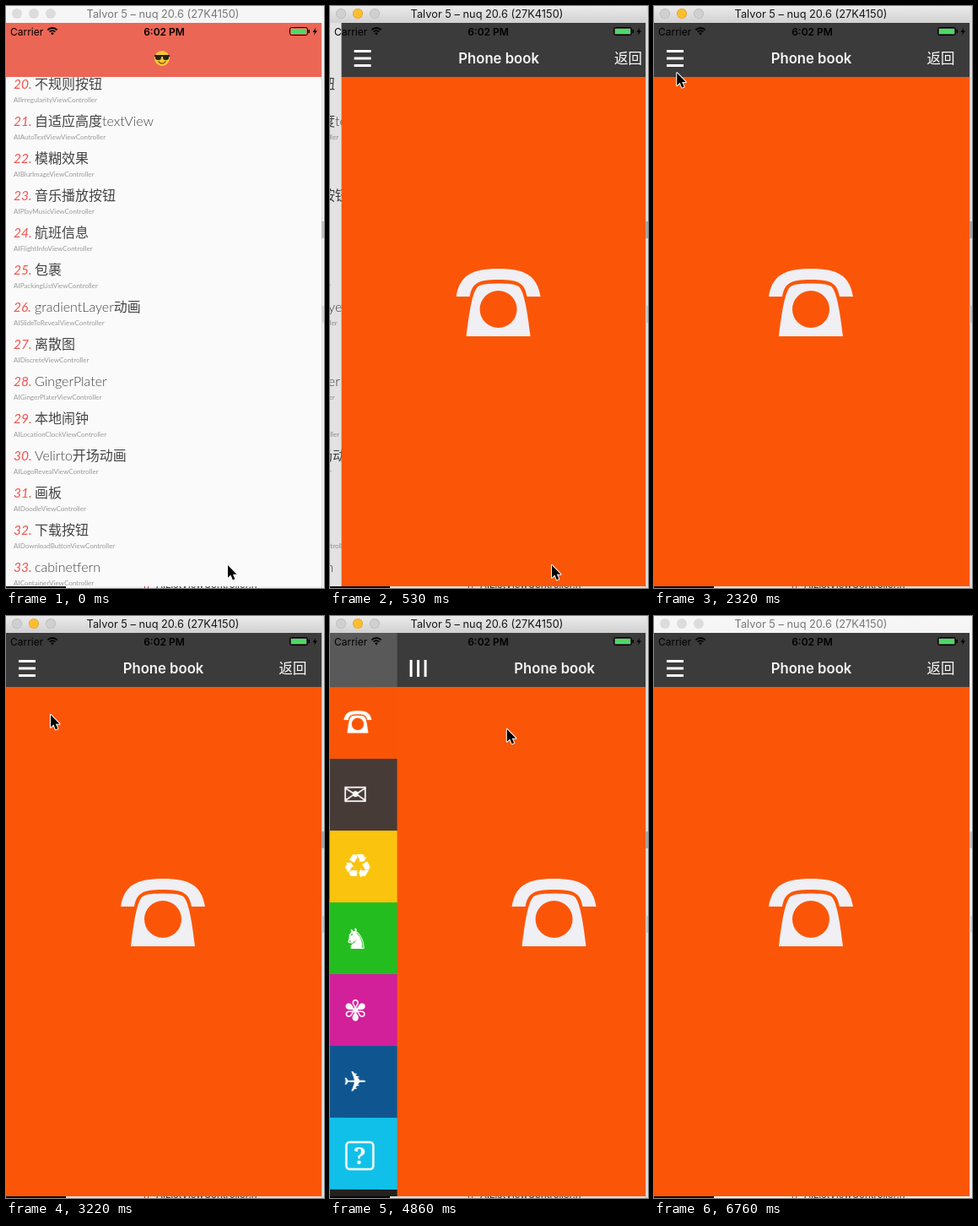
An HTML page with a canvas that plays this animation: 377x689 px, repeating every 6860 ms.

```html
<!DOCTYPE html>
<html lang="zh">
<head>
<meta charset="utf-8">
<title>Phone book</title>
<style>
html, body { margin: 0; width: 100%; height: 100%; overflow: hidden; background: #fff; }
canvas { display: block; width: 377px; height: 689px; }
</style>
</head>
<body>
<canvas id="stage" width="377" height="689"></canvas>
<script>
const ctx = document.getElementById('stage').getContext('2d');
const LOOP = 6860, WIDTH = 374, TOP = 20, BOTTOM = 687, MENU = 80;
const UI = 'Inter, "Noto Sans CJK SC", "Noto Sans CJK", sans-serif';
const LIST = 'Lato, "Noto Sans CJK SC", "Noto Sans CJK", sans-serif';
const SYMBOL = '"DejaVu Sans", sans-serif';
const ORANGE = '#fb5607';

const rows = [
  ['不规则按钮', 'Irregularity'],
  ['自适应高度textView', 'AutoTextView'],
  ['模糊效果', 'BlurImage'],
  ['音乐播放按钮', 'PlayMusic'],
  ['航班信息', 'FlightInfo'],
  ['包裹', 'PackingList'],
  ['gradientLayer动画', 'SlideToReveal'],
  ['离散图', 'Discrete'],
  ['GingerPlater', 'GingerPlater'],
  ['本地闹钟', 'LocationClock'],
  ['Velirto开场动画', 'LogoReveal'],
  ['画板', 'Doodle'],
  ['下载按钮', 'DownloadButton'],
  ['cabinetfern', 'Container']
];

// colour, symbol, size, centre x
const items = [
  [ORANGE],
  ['#483c38', '\u2709', 36, 30],
  ['#fbc40e', '\u267b', 40, 33],
  ['#24be21', '\u265e', 34, 31],
  ['#d3209b', '\u273e', 34, 30],
  ['#105792', '\u2708', 34, 30],
  ['#12c1e9']
];

// time, x, y
const cursorKeys = [
  [0, 263, 662], [810, 263, 662], [980, 239, 424],
  [1350, 239, 424], [1540, 257, 405], [1710, 142, 221],
  [1860, 142, 221], [2380, 23, 74], [2930, 23, 74],
  [3220, 53, 117], [3480, 53, 117], [3970, 156, 121],
  [4460, 156, 121], [4660, 210, 134], [4850, 210, 134],
  [5330, 91, 145], [5630, 91, 145], [5840, 346, 617],
  [6030, 346, 617], [6270, 341, 692], [LOOP, 341, 692]
];

const clamp = v => Math.max(0, Math.min(1, v));
const smooth = v => v * v * (3 - 2 * v);

function rect(c, color, x, y, w, h) {
  c.fillStyle = color;
  c.fillRect(x, y, w, h);
}

function disc(c, color, x, y, r) {
  c.fillStyle = color;
  c.beginPath();
  c.arc(x, y, r, 0, Math.PI * 2);
  c.fill();
}

function text(c, str, x, y, font, color, align = 'left') {
  c.font = font;
  c.fillStyle = color;
  c.textAlign = align;
  c.fillText(str, x, y);
}

function symbol(c, str, cx, cy, size) {
  c.font = `${size}px ${SYMBOL}`;
  c.textAlign = 'left';
  c.fillStyle = '#fff';
  const m = c.measureText(str);
  c.fillText(str,
    cx + (m.actualBoundingBoxLeft - m.actualBoundingBoxRight) / 2,
    cy + (m.actualBoundingBoxAscent - m.actualBoundingBoxDescent) / 2);
}

const phonePath = new Path2D(
  'M-50 33C-46 9-33 0 0 0S46 9 50 33H34C31 18 26 13 0 13S-31 18-34 33Z' +
  'M-38 80C-34 46-30 26-24 21C-20 18-10 17.5 0 17.5S20 18 24 21C30 26 34 46 38 80Z' +
  'M22 48A22 22 0 1 0-22 48A22 22 0 1 0 22 48Z');

function phone(c, x, y, scale, color) {
  c.save();
  c.translate(x, y);
  c.scale(scale, scale);
  c.fillStyle = color;
  c.fill(phonePath, 'evenodd');
  c.restore();
}

function makeMenu() {
  const sheet = document.createElement('canvas');
  sheet.width = MENU;
  sheet.height = BOTTOM - TOP;
  const c = sheet.getContext('2d');
  rect(c, '#222', 0, 0, MENU, sheet.height);
  rect(c, '#5a5a5a', 0, 0, MENU, 64);
  items.forEach(([color, glyph, size, x], i) => {
    const y = 64 + i * 85;
    rect(c, color, 0, y, MENU, 85);
    if (glyph) symbol(c, glyph, x, y + 42, size);
  });
  phone(c, 33, 92, 0.33, '#fff');
  c.strokeStyle = '#fff';
  c.lineWidth = 2.5;
  c.beginPath();
  c.roundRect(19.5, 603, 32, 32, 4);
  c.stroke();
  text(c, '?', 35.5, 629, 'bold 27px "Noto Serif", serif', '#fff', 'center');
  return sheet;
}
const menuSheet = makeMenu();

function backdrop(active) {
  rect(ctx, active ? '#dedede' : '#f2f2f2', 0, 0, 377, 689);
  rect(ctx, active ? '#bdbdbd' : '#dadada', WIDTH, TOP, 1, 669);
  rect(ctx, active ? '#a4a4a4' : '#c2c2c2', WIDTH, 255, 3, 20);
  rect(ctx, active ? '#c4c4c4' : '#d8d8d8', WIDTH, 355, 3, 20);
  rect(ctx, '#0a0505', 0, BOTTOM, 71, 2);
  ctx.save();
  ctx.beginPath();
  ctx.rect(0, BOTTOM, 377, 2);
  ctx.clip();
  text(ctx, 'h', 163, 689, `12px ${UI}`, '#b33');
  text(ctx, 'AIListViewController.h', 178, 689, `11.5px ${UI}`, '#333');
  ctx.restore();
}

function titleBar(active) {
  const fill = ctx.createLinearGradient(0, 0, 0, TOP);
  fill.addColorStop(0, active ? '#ebebeb' : '#f7f7f7');
  fill.addColorStop(1, active ? '#d1d1d1' : '#f5f5f5');
  rect(ctx, fill, 0, 0, 375, TOP);
  for (let i = 0; i < 3; i++) {
    const x = 13 + i * 20;
    if (!active) disc(ctx, '#dcdcdc', x, 9, 6);
    else {
      disc(ctx, i === 1 ? '#dfa023' : '#b9b9b9', x, 9, 6);
      disc(ctx, i === 1 ? '#fdbe30' : '#d0d0d0', x, 9, 5.2);
    }
  }
  text(ctx, 'Talvor 5 – nuq 20.6 (27K4150)', 186, 14, `12.8px ${UI}`,
    active ? '#161616' : '#777', 'center');
}

function statusBar() {
  text(ctx, 'Carrier', 5, 34.5, `12px ${UI}`, '#000');
  text(ctx, '6:02 PM', 187.5, 34.5, `600 12px ${UI}`, '#000', 'center');
  ctx.strokeStyle = '#000';
  ctx.lineWidth = 1.8;
  for (const r of [4.8, 8]) {
    ctx.beginPath();
    ctx.arc(55, 34, r, -Math.PI * 0.75, -Math.PI * 0.25);
    ctx.stroke();
  }
  ctx.fillStyle = '#000';
  ctx.beginPath();
  ctx.moveTo(55, 34.5);
  ctx.arc(55, 34, 2.6, -Math.PI * 0.75, -Math.PI * 0.25);
  ctx.fill();
  ctx.lineWidth = 1;
  ctx.beginPath();
  ctx.roundRect(336.5, 25.5, 21, 9, 2);
  ctx.stroke();
  rect(ctx, '#4cd964', 338, 27, 18, 6);
  rect(ctx, '#000', 358.5, 28, 1.5, 4);
  ctx.fill(new Path2D('M367.5 25.5L363.5 31H366L364.8 35L369 29.3H366.4Z'));
}

function coolFace(x, y) {
  disc(ctx, '#f9c633', x, y, 9);
  rect(ctx, '#222', x - 9, y - 4, 18, 2);
  ctx.beginPath();
  ctx.roundRect(x - 8, y - 4, 7, 6, [0, 0, 3, 3]);
  ctx.roundRect(x + 1, y - 4, 7, 6, [0, 0, 3, 3]);
  ctx.fill();
  ctx.strokeStyle = '#7a4a12';
  ctx.lineWidth = 1.2;
  ctx.beginPath();
  ctx.arc(x, y + 1.5, 4.5, 0.4, Math.PI - 0.4);
  ctx.stroke();
}

function listPage(pushed, moving) {
  rect(ctx, '#fafafa', 0, TOP, WIDTH, BOTTOM - TOP);
  ctx.save();
  ctx.translate(-112 * pushed, 0);
  rows.forEach(([title, name], i) => {
    const y = 98 + i * 44;
    text(ctx, `${20 + i}.`, 9, y, `italic 15.5px ${LIST}`, '#f4544f');
    text(ctx, title, 34, y, `300 16px ${LIST}`, '#444');
    text(ctx, `AI${name}ViewController`, 9, y + 16, `8px ${LIST}`, '#999');
  });
  ctx.restore();
  if (moving) {
    rect(ctx, `rgba(0,0,0,${0.1 * pushed})`, 0, TOP, WIDTH, BOTTOM - TOP);
  } else {
    rect(ctx, '#ec6655', 0, TOP, WIDTH, 64);
    coolFace(185, 62);
  }
}

// Bars flip about their diagonal, ending upright.
function menuButton(open) {
  const c = Math.cos(Math.PI * open), a = (1 + c) / 2, b = (1 - c) / 2;
  ctx.save();
  ctx.translate(25, 62);
  ctx.transform(a, b, b, a, 0, 0);
  for (const y of [-10, -1.5, 7]) rect(ctx, '#fff', -10, y, 20, 3);
  ctx.restore();
}

function bookPage(x, open) {
  ctx.save();
  ctx.translate(x, 0);
  rect(ctx, ORANGE, 0, 84, 375, BOTTOM - 84);
  rect(ctx, '#3b3b3b', 0, TOP, 375, 64);
  menuButton(open);
  text(ctx, 'Phone book', 186.5, 68, `600 16.7px ${UI}`, '#f4f4f4', 'center');
  text(ctx, '返回', 340, 68, `300 16.5px ${UI}`, '#fff', 'center');
  phone(ctx, 186, 311, 1, '#f0eff4');
  ctx.restore();
}

// Side menu swings in perspective around its right edge.
function sideMenu(open) {
  rect(ctx, '#000', 0, TOP, MENU, BOTTOM - TOP);
  const angle = (1 - open) * Math.PI / 2;
  const cos = Math.cos(angle), sin = Math.sin(angle);
  const h = menuSheet.height, middle = TOP + h / 2, edge = MENU * open;
  const project = d => {
    const k = 1 / (1 + d * sin / 1000);
    return [edge - d * cos * k, k];
  };
  ctx.globalAlpha = Math.max(0.2, open);
  if (open === 1) ctx.drawImage(menuSheet, 0, TOP);
  else for (let i = 0; i < MENU; i++) {
    const [x, k] = project(MENU - i), [next] = project(MENU - i - 1);
    ctx.drawImage(menuSheet, i, 0, 1, h, x, middle - h * k / 2, next - x + 0.3, h * k);
  }
  ctx.globalAlpha = 1;
}

const arrow = new Path2D('M0 0V14.8L3.4 11.6L5.9 17.4L8.4 16.3L5.9 10.7H10.5Z');

function cursor(t) {
  const i = cursorKeys.findIndex(k => k[0] > t);
  const [t0, x0, y0] = cursorKeys[i - 1], [t1, x1, y1] = cursorKeys[i];
  const p = smooth((t - t0) / (t1 - t0));
  ctx.save();
  ctx.translate(x0 + (x1 - x0) * p, y0 + (y1 - y0) * p);
  ctx.strokeStyle = '#fff';
  ctx.lineWidth = 2;
  ctx.lineJoin = 'round';
  ctx.stroke(arrow);
  ctx.fillStyle = '#000';
  ctx.fill(arrow);
  ctx.restore();
}

function remaining(t) {
  const s = 18.26 * Math.max(0, t - 250) / 1000;
  return t >= 740 ? 0 : (1 + s) * Math.exp(-s);
}

function draw(t) {
  const active = t >= 90 && t < 6760;
  const left = remaining(t);
  const open = smooth(clamp((t - 3430) / 500)) - smooth(clamp((t - 4840) / 500));
  backdrop(active);
  titleBar(active);
  ctx.save();
  ctx.beginPath();
  ctx.rect(0, TOP, WIDTH, BOTTOM - TOP);
  ctx.clip();
  if (left > 0) listPage(1 - left, left < 1);
  if (open > 0) sideMenu(open);
  if (left < 1) bookPage(375 * left + MENU * open, open);
  statusBar();
  ctx.restore();
  cursor(t);
}

function tick() {
  draw(performance.now() % LOOP);
  requestAnimationFrame(tick);
}
tick();
</script>
</body>
</html>
```
